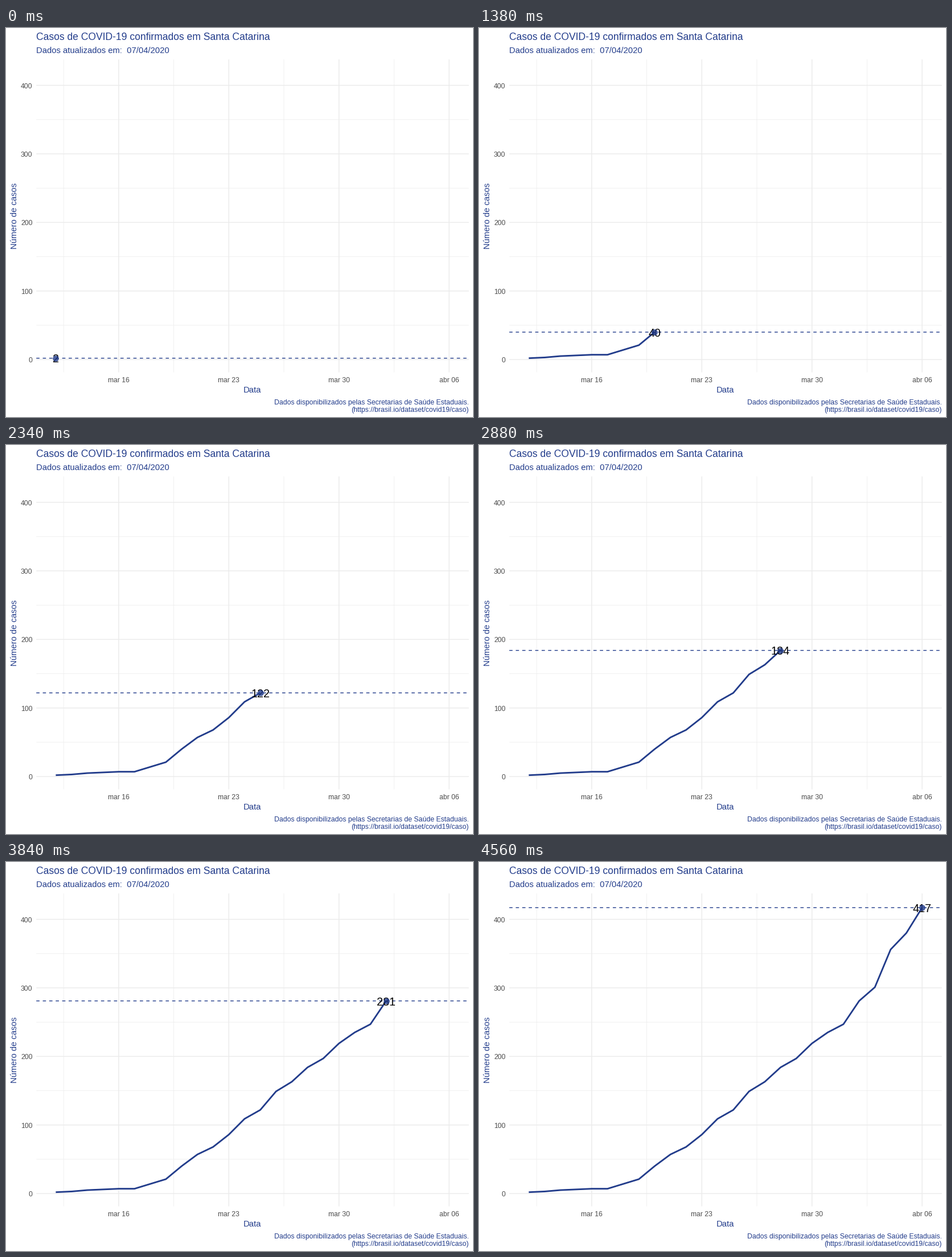
Animation, 820 px wide and 683 px high, one loop 6.42 s. Source, as a matplotlib script:

```python
import math

import matplotlib.pyplot as plt
from matplotlib.animation import FuncAnimation

W, H, DPI = 820, 683, 64
PT = 72 / DPI  # points per pixel
TICK_MS, TICKS = 60, 107
BLUE, GRID, GREY = "#223C8B", "#EBEBEB", "#4D4D4D"
LEFT, RIGHT, TOP, BOTTOM = 53.2, 812.7, 55.2, 604.6

CASES = [2, 3, 5, 6, 7, 7, 14, 21, 40, 57, 68, 86, 109, 122, 149, 163, 184,
         197, 219, 235, 247, 281, 301, 356, 380, 417]


def px(day):
    return 87.4 + 27.625 * day


def py(cases):
    return 582.12 - 1.2037 * cases


def first_tick(day):
    """Tick at which a day is revealed; two days linger one tick longer."""
    return 3 * day - 1 + (day >= 10) + (day >= 18)


plt.rcParams["font.family"] = "Liberation Sans"
fig = plt.figure(figsize=(W / DPI, H / DPI), dpi=DPI, facecolor="white")
ax = fig.add_axes([0, 0, 1, 1])
ax.set_xlim(0, W)
ax.set_ylim(H, 0)
ax.axis("off")


def text(x, y, s, size, color=BLUE, ha="left", **kw):
    return ax.text(x, y, s, fontsize=size * PT, color=color, ha=ha,
                   va="baseline", **kw)


def stroke(xs, ys, width, color, **kw):
    line, = ax.plot(xs, ys, color=color, lw=width * PT, snap=False,
                    solid_capstyle="butt", dash_capstyle="butt", **kw)
    return line


def h_grid(cases, width):
    stroke([LEFT, RIGHT], [py(cases)] * 2, width, GRID, zorder=1)


def v_grid(day, width):
    stroke([px(day)] * 2, [TOP, BOTTOM], width, GRID, zorder=1)


for cases in range(50, 400, 100):
    h_grid(cases, 0.71)
for day in (0.5, 7.5, 14.5, 21.5):
    v_grid(day, 0.71)
for cases in range(0, 500, 100):
    h_grid(cases, 1.42)
    text(46.5, round(py(cases)) + 5, str(cases), 12.1, GREY, "right")
for day, name in zip((4, 11, 18, 25), ("mar 16", "mar 23", "mar 30", "abr 06")):
    v_grid(day, 1.42)
    text(px(day), 622, name, 12.1, GREY, "center")

text(53, 21, "Casos de COVID-19 confirmados em Santa Catarina", 17.55)
text(53, 44, "Dados atualizados em:  07/04/2020", 14.8)
text(432.7, 640, "Data", 14.7, ha="center")
text(19, 329.5, "Número de casos", 14.7, ha="center",
     rotation=90, rotation_mode="anchor")
text(813, 661, "Dados disponibilizados pelas Secretarias de Saúde Estaduais.",
     12.25, ha="right")
text(813, 674, "(https://brasil.io/dataset/covid19/caso)", 12.25, ha="right")

curve = stroke([], [], 2.85, BLUE, zorder=3, solid_joinstyle="round")
level = stroke([LEFT, RIGHT], [0, 0], 1.42, BLUE, zorder=4,
               linestyle=(0, (4, 4)))
label = text(0, 0, "", 19.6, "black", "center", zorder=5)
dot, = ax.plot([], [], "o", ms=9.5 * PT, mew=0.94 * PT, color=BLUE,
               alpha=0.8, snap=False, zorder=6)


def draw(tick):
    day = sum(first_tick(d) <= tick for d in range(1, len(CASES)))
    x, y = px(day), py(CASES[day])
    curve.set_data([px(d) for d in range(day + 1)],
                   [py(c) for c in CASES[:day + 1]])
    level.set_ydata([y, y])
    label.set_text(str(CASES[day]))
    label.set_position((x, math.floor(y + 0.25) + 8))
    dot.set_data([x], [y])
    return curve, level, label, dot


anim = FuncAnimation(fig, draw, frames=TICKS, interval=TICK_MS,
                     repeat=True, repeat_delay=0, blit=False)
plt.show()
```
